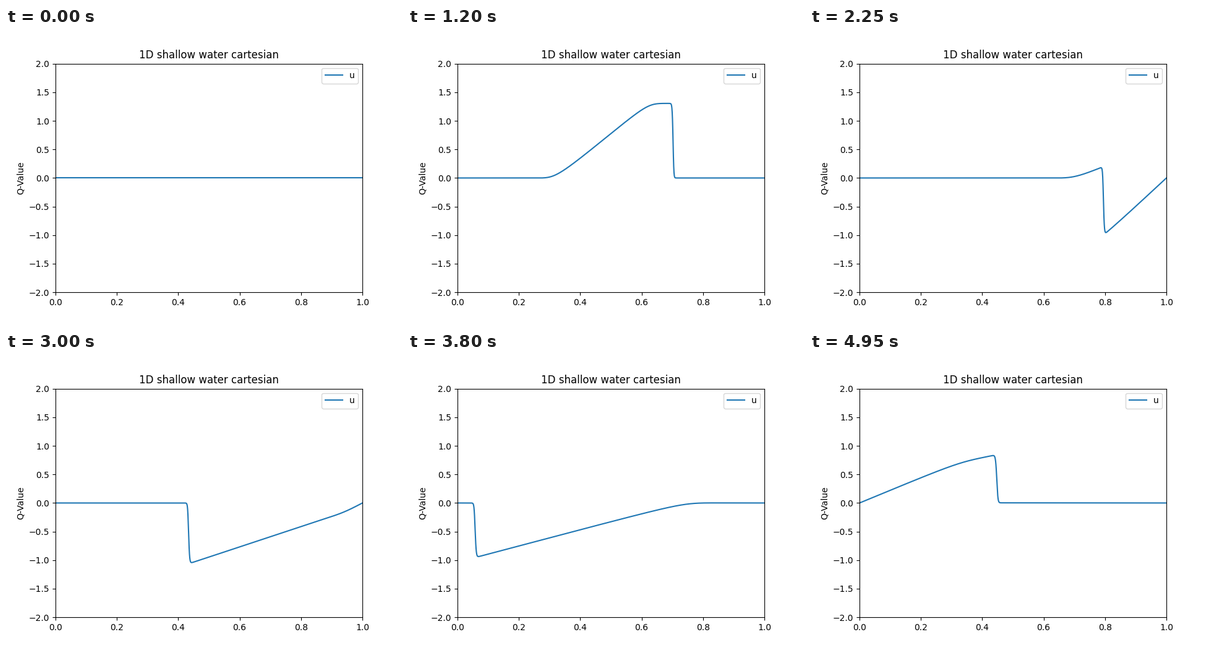
Write a matplotlib script that moves like this. It is 640 px wide and 480 px high and loops after 5 s.

```python
import numpy as np
import matplotlib.pyplot as plt
from matplotlib.animation import FuncAnimation

GRAVITY = 9.81
CELLS = 1000
DX = 1 / CELLS
DT = 1e-4
STEPS_PER_FRAME = 60
FRAMES = 100
INTERVAL = 50
DAM = 0.1


def step(h, q):
    """Advance depth and discharge by one Rusanov step between solid walls."""
    # Mirrored ghost cells reflect the flow at both ends.
    h = np.concatenate((h[:1], h, h[-1:]))
    q = np.concatenate((-q[:1], q, -q[-1:]))
    u = q / h
    momentum = q * u + 0.5 * GRAVITY * h * h
    speed = np.abs(u) + np.sqrt(GRAVITY * h)
    a = np.maximum(speed[:-1], speed[1:])

    def update(value, flux):
        face = 0.5 * (flux[:-1] + flux[1:] - a * np.diff(value))
        return value[1:-1] - DT / DX * np.diff(face)

    return update(h, q), update(q, momentum)


def simulate(x):
    """Velocity profile of the dam break at every frame."""
    h = np.where(x < DAM, 2.0, 1.0)
    q = np.zeros_like(x)
    profiles = [q / h]
    for _ in range(FRAMES - 1):
        for _ in range(STEPS_PER_FRAME):
            h, q = step(h, q)
        profiles.append(q / h)
    return profiles


x = (np.arange(CELLS) + 0.5) * DX
velocity = simulate(x)

# Close the curve at the walls, where the velocity is zero.
x_plot = np.concatenate(([0], x, [1]))

fig, ax = plt.subplots(figsize=(6.4, 4.8), dpi=100)
line, = ax.plot(x_plot, np.zeros_like(x_plot), label="u")
ax.set_xlim(0, 1)
ax.set_ylim(-2, 2)
ax.set_title("1D shallow water cartesian")
ax.set_ylabel("Q-Value")
ax.legend(loc="upper right")


def draw(frame):
    line.set_ydata(np.pad(velocity[frame], 1))
    return line,


anim = FuncAnimation(fig, draw, frames=FRAMES, interval=INTERVAL,
                     repeat=True, repeat_delay=0)
plt.show()
```
